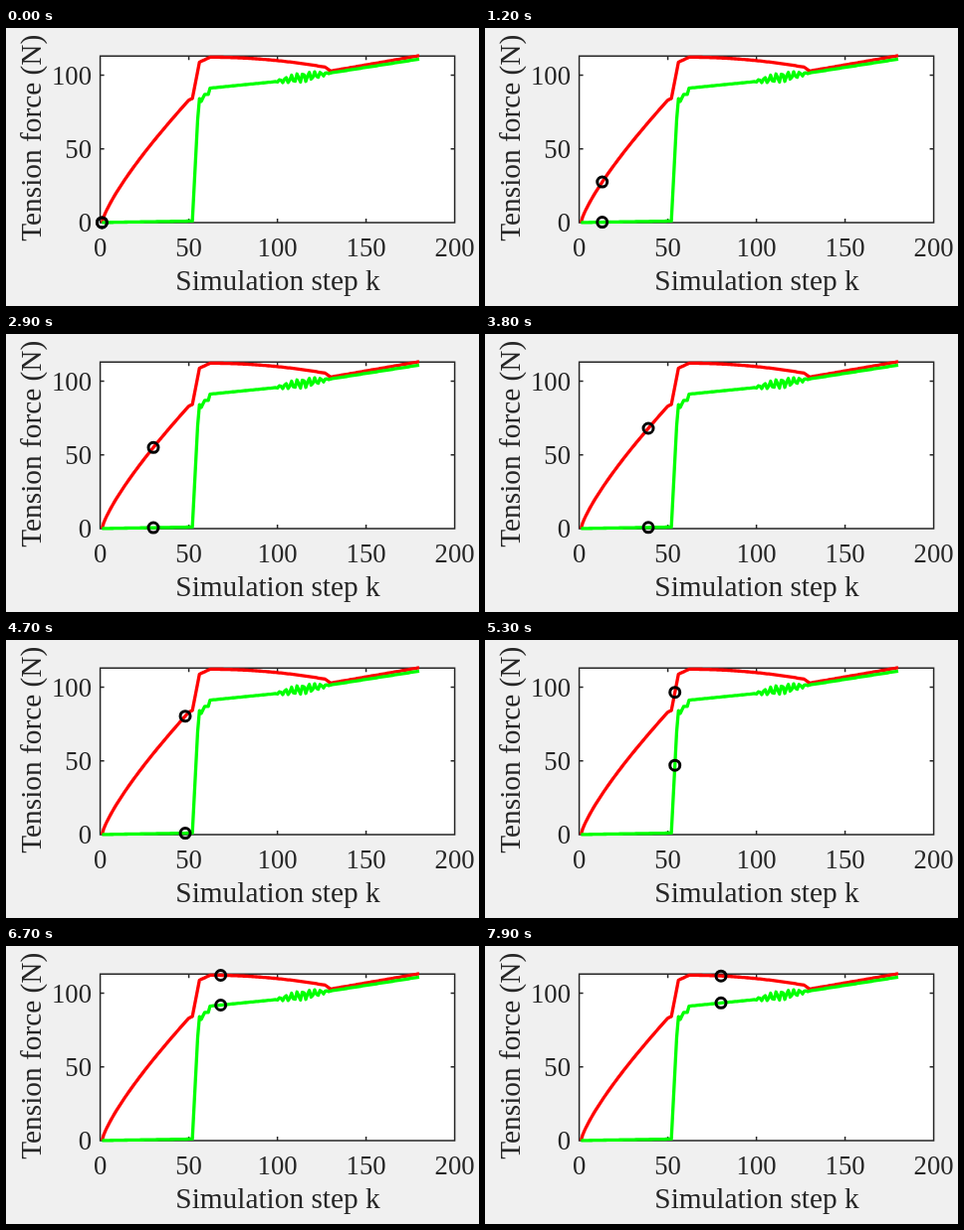
Animation, 475 px wide and 280 px high, one loop 8 s. Source, as an HTML page:

```html
<!DOCTYPE html>
<html lang="en">
<head>
<meta charset="utf-8">
<title>Tension force</title>
<style>
html, body { margin: 0; width: 100%; height: 100%; overflow: hidden; background: #f0f0f0; }
svg { display: block; width: 475px; height: 280px; }
text { font: 26.67px "Liberation Serif", "Times New Roman", serif; fill: #262626; text-anchor: middle; }
.label { font-size: 29.33px; }
.ticks .y { text-anchor: end; }
.axes { fill: #fff; stroke: #262626; stroke-width: 1.5; }
.curve { fill: none; stroke-width: 3.3; stroke-linejoin: round; }
circle { fill: none; stroke: #000; stroke-width: 3; }
</style>
</head>
<body>
<svg viewBox="0 0 475 280">
  <path class="axes" id="axes"/>
  <g class="ticks" id="ticks"></g>
  <text class="label" x="273" y="264">Simulation step k</text>
  <text class="label" transform="translate(35 110.8) rotate(-90)">Tension force (N)</text>
  <path class="curve" id="redLine" stroke="#f00"/>
  <path class="curve" id="greenLine" stroke="#0f0"/>
  <circle id="redDot" r="5"/>
  <circle id="greenDot" r="5"/>
</svg>
<script>
const $ = id => document.getElementById(id);
const LEFT = 94.6, RIGHT = 450.6, TOP = 28.2, BOTTOM = 195.9;
const xOf = k => LEFT + k * 1.78;
const yOf = force => BOTTOM - force * 1.484;

// Straight runs between [step, force] points
function along(points, k) {
  const i = Math.max(1, points.findIndex(p => p[0] >= k));
  const [k0, f0] = points[i - 1], [k1, f1] = points[i];
  return f0 + (f1 - f0) * (k - k0) / (k1 - k0);
}

// Position of k within a span, 0 to 1
const within = (k, from, to) => Math.min(1, Math.max(0, (k - from) / (to - from)));

const redRuns = [[50, 83], [52, 84.2], [56, 108.8], [62, 112.2], [127, 105.4], [130, 102.8], [180, 113.2]];
const greenRuns = [[1, 0], [52, 1], [55, 70], [56, 84], [57, 82.2], [59, 87], [61, 87], [62, 91.2], [98, 95.5], [180, 110.9]];

function red(k) {
  if (k < 50) return 83 * ((k - 1) / 49) ** 0.785;
  const u = within(k, 62, 127);
  return along(redRuns, k) + 6.8 * u * (1 - u);
}

function green(k) {
  const swell = Math.sin(Math.PI * within(k, 98, 130));
  return along(greenRuns, k) + 3.2 * swell * Math.cos(2 * Math.PI * (k - 124.3) / 3.28);
}

function trace(curve) {
  let d = "";
  for (let k = 1; k <= 180; k++) d += `${d ? "L" : "M"}${xOf(k)} ${yOf(curve(k))}`;
  return d;
}

let axes = `M${LEFT} ${TOP}H${RIGHT}V${BOTTOM}H${LEFT}Z`, labels = "";
for (let k = 0; k <= 200; k += 50) {
  axes += `M${xOf(k)} ${BOTTOM}v-4M${xOf(k)} ${TOP}v4`;
  labels += `<text x="${xOf(k)}" y="230">${k}</text>`;
}
for (let f = 0; f <= 100; f += 50) {
  axes += `M${LEFT} ${yOf(f)}h4M${RIGHT} ${yOf(f)}h-4`;
  labels += `<text class="y" x="86" y="${yOf(f) + 9}">${f}</text>`;
}
$("axes").setAttribute("d", axes);
$("ticks").innerHTML = labels;
$("redLine").setAttribute("d", trace(red));
$("greenLine").setAttribute("d", trace(green));

function place(dot, curve, k) {
  dot.setAttribute("cx", xOf(k));
  dot.setAttribute("cy", yOf(curve(k)));
}

function draw() {
  const k = 1 + Math.floor(performance.now() % 8000 / 100);
  place($("redDot"), red, k);
  place($("greenDot"), green, k);
  requestAnimationFrame(draw);
}
draw();
</script>
</body>
</html>
```
